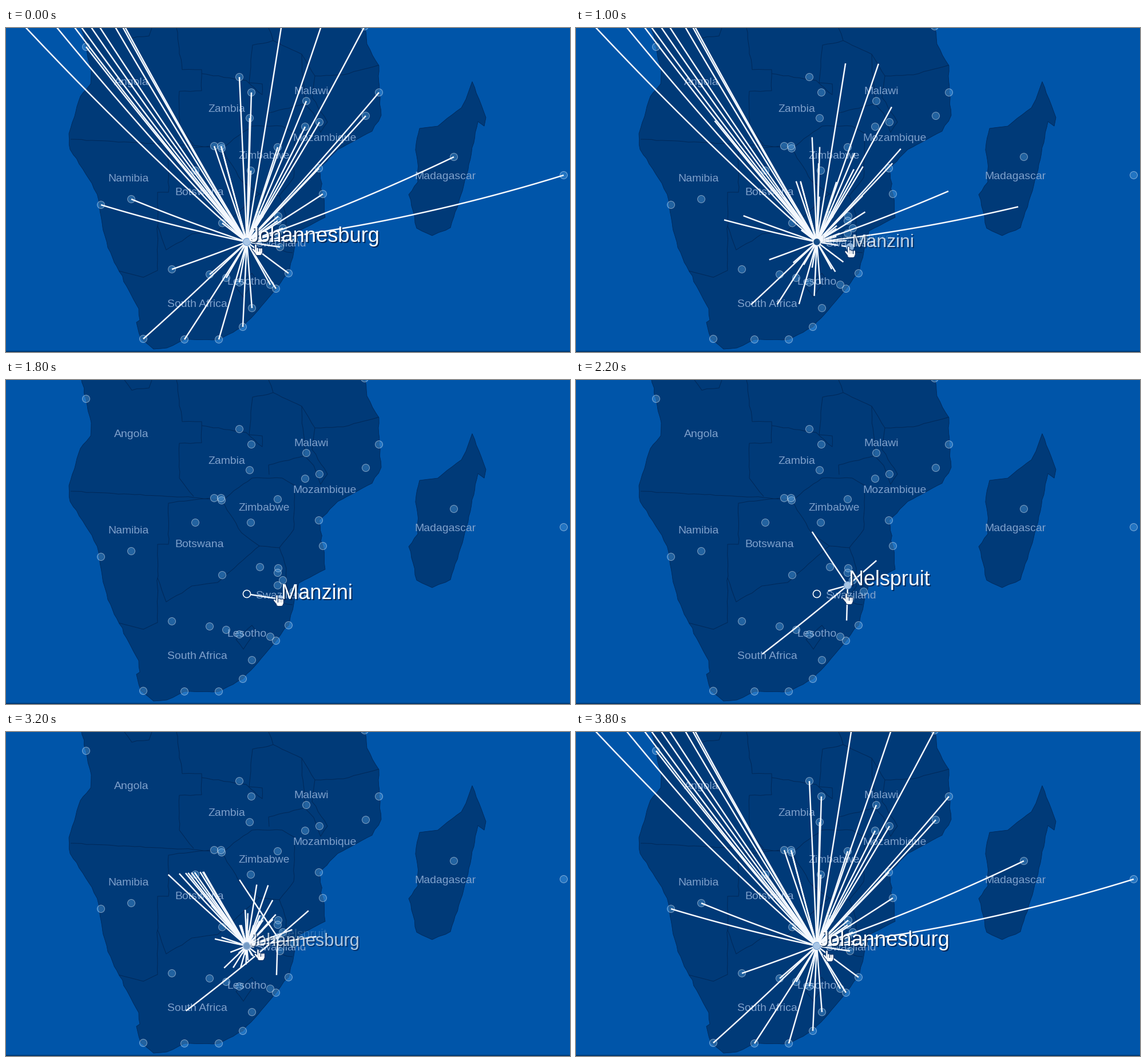
A matplotlib script that plays this animation: 986 px wide and 568 px high, repeating every 3900 ms.

```python
import numpy as np
import matplotlib.pyplot as plt
from matplotlib.animation import FuncAnimation
from matplotlib.collections import LineCollection
from matplotlib.patches import Circle, Polygon

W, H, DPI = 986, 568, 64
STEP, FRAMES = 100, 39
LOOP = STEP * FRAMES
PT = 72 / DPI  # points per pixel
SEA, LAND, BORDER = "#0055a9", "#003a78", "#002858"
FONT = "Liberation Sans"
GROW, LABEL_TIME = 500, 330
SAG = 1.75e-4
rng = np.random.default_rng(4)

# Ports also serve as key points of the coastline
PORTS = [(140, 33), (166, 310), (240, 545), (312, 546), (372, 546), (414, 524),
         (472, 457), (494, 430), (554, 291), (547, 246), (652, 113), (627, -3)]
(LUANDA, WALVIS, CAPE, GEORGE, ALGOA, BUFFALO,
 DURBAN, RICHARDS, VILANCULOS, BEIRA, NACALA, DAR) = PORTS
JNB, MANZINI, NELSPRUIT, FALLS = (421, 375), (479, 384), (475, 360), (377, 211)
INLAND = [
    MANZINI, NELSPRUIT, FALLS, (364, 207), (376, 207), (408, 86), (429, 113),
    (426, 158), (525, 128), (548, 165), (523, 173), (629, 154), (475, 209),
    (428, 250), (331, 250), (783, 226), (975, 258), (219, 300), (378, 342),
    (444, 328), (476, 330), (475, 338), (484, 351), (503, 371), (290, 423),
    (356, 432), (385, 438), (408, 446), (462, 450), (430, 491)]
AIRPORTS = PORTS + INLAND

MAINLAND = [
    (131, -5), LUANDA, (149, 75), (148, 98), (130, 120), (110, 185), (112, 213),
    (150, 272), (162, 302), (168, 342), (178, 385), (198, 427), (232, 492),
    (234, 512), (228, 516), (236, 545), (258, 563), (281, 561), GEORGE, ALGOA,
    BUFFALO, DURBAN, RICHARDS, (512, 356), (558, 332), VILANCULOS, BEIRA,
    (580, 213), (640, 181), (656, 153), NACALA, (652, 66), (631, 28), DAR]
MADAGASCAR = [
    (815, 94), (831, 135), (839, 157), (836, 172), (825, 164), (805, 258),
    (777, 350), (745, 364), (718, 351), (704, 292), (720, 270), (717, 203),
    (723, 176), (755, 172), (796, 140), (804, 125)]
BORDERS = [
    [(113, 195), (150, 197), (328, 206), FALLS, (430, 172), (483, 172)],
    [(207, 0), (220, 18), (250, 14), (255, 0)],
    [(298, 0), (308, 73), (342, 73), (342, 110), (303, 111), (303, 172), (328, 204)],
    [(357, 207), (284, 216), (284, 288), (265, 288), (265, 425), (240, 437), (198, 426)],
    [(265, 347), (280, 389), (325, 361), (370, 355), (443, 291)],
    [(402, 455), (430, 430), (437, 440), (415, 472), (402, 455)],
    [(342, 80), (420, 92), (448, 117), (448, 98), (425, 96), (431, 30), (467, 22), (459, 0)],
    [(467, 22), (517, 46), (522, 133), (459, 149), (460, 166)],
    [(483, 172), (505, 185), (503, 262), (478, 294), (490, 330), (490, 362),
     (472, 388), (501, 394)],
    [(517, 46), (540, 84), (535, 122), (562, 165), (550, 183), (538, 150), (522, 133)],
    [(540, 84), (590, 82), (652, 65)],
    [FALLS, (412, 268), (443, 291), (478, 294)]]

COUNTRIES = [
    ("Angola", 219, 93), ("Zambia", 386, 140), ("Malawi", 534, 109),
    ("Mozambique", 557, 191), ("Zimbabwe", 451, 222), ("Botswana", 338, 286),
    ("Namibia", 214, 262), ("Madagascar", 768, 258), ("Swaziland", 480, 376),
    ("Lesotho", 421, 443), ("South Africa", 334, 482)]

# time, x, y
CURSOR = np.array([(0, 440, 388), (700, 440, 388), (900, 480, 393), (2600, 475, 380),
                   (2900, 475, 380), (3200, 444, 390), (3800, 442, 392)])


def rough(points, size):
    """Split a polyline into short pieces and shake them a little."""
    out = []
    for a, b in zip(np.array(points[:-1], float), np.array(points[1:], float)):
        n = max(1, int(np.hypot(*(b - a)) // 9))
        piece = a + np.linspace(0, 1, n, endpoint=False)[:, None] * (b - a)
        piece[1:] += rng.normal(0, size, piece[1:].shape)
        out.extend(piece)
    return np.array(out + [points[-1]])


def ease(t):
    t = min(max(t, 0), 1)
    return 4 * t**3 if t < 0.5 else 1 - 4 * (1 - t)**3


def presence(now, spans, duration):
    return sum(ease((now - a) / duration) - ease((now - b) / duration)
               for a, b in spans)


def sag(dx, dy):
    return SAG * abs(dx) * np.hypot(dx, dy)


def route(start, end, part):
    """Part of a flight path that sags southward like a great circle."""
    u = np.linspace(0, part, 24)
    dx, dy = end[0] - start[0], end[1] - start[1]
    return np.column_stack([start[0] + dx * u,
                            start[1] + dy * u + sag(dx, dy) * u * (1 - u)])


def beyond(x, part):
    """Far place whose route leaves the top edge at x after the given part."""
    dx, dy = (x - JNB[0]) / part, -JNB[1] / part
    return JNB[0] + dx, JNB[1] + dy - sag(dx, dy) * (1 - part)


FAR = [beyond(x, 0.615) for x in (36, 90, 121, 133, 150, 165, 192, 205, 209)]
FAR += [beyond(x, 0.76) for x in (481, 550)]

# name, place, destinations, (start, stop) times of each hover
HUBS = [
    ("Johannesburg", JNB, AIRPORTS + FAR, [(3010 - LOOP, 775), (3010, 775 + LOOP)]),
    ("Manzini", MANZINI, [JNB], [(800, 1900)]),
    ("Nelspruit", NELSPRUIT, [JNB, FALLS, VILANCULOS, CAPE, DURBAN], [(1925, 2985)])]

fig = plt.figure(figsize=(W / DPI, H / DPI), dpi=DPI, facecolor=SEA)
ax = fig.add_axes([0, 0, 1, 1])
ax.set_xlim(0, W)
ax.set_ylim(H, 0)
ax.axis("off")

for shape in (MAINLAND, MADAGASCAR):
    ax.add_patch(Polygon(rough(shape, 0.7), fc=LAND, ec=BORDER, lw=0.8 * PT, zorder=1))
ax.add_collection(LineCollection([rough(b, 0.5) for b in BORDERS], colors=BORDER,
                                 linewidths=PT, zorder=2))

for name, x, y in COUNTRIES:
    ax.text(x, y + 7, name, family=FONT, size=19.4 * PT, color="#7fa0cb",
            ha="center", va="baseline", zorder=3)

for spot in AIRPORTS:
    ax.add_patch(Circle(spot, 6.5, fc=(0.45, 0.75, 1, 0.3), ec=(1, 1, 1, 0.45),
                        lw=PT, zorder=4))

ax.plot([0, W], [567, 567], color="#003a74", lw=2 * PT, zorder=9)
ax.plot([985.5, 985.5], [0, H], color="#001428", lw=PT, zorder=9)
ax.add_patch(Circle(JNB, 6.5, fc=LAND, ec="white", lw=1.6 * PT, zorder=6))


def make_hub(name, spot):
    lines = LineCollection([], colors="#f5f9ff", linewidths=2.5 * PT, zorder=5)
    ax.add_collection(lines)
    dot = ax.add_patch(Circle(spot, 6.5, fc="#a9c6e6", ec="#6c9ad0", lw=PT, zorder=6.5))
    style = dict(family=FONT, ha="left", va="baseline")
    shade = ax.text(spot[0] + 4, spot[1] + 2, name, color="#00204a", zorder=7, **style)
    label = ax.text(spot[0] + 2, spot[1], name, color="white", zorder=8, **style)
    return lines, dot, shade, label


def make_hand():
    """Pointing hand of round strokes: index, three fingers, thumb, palm."""
    strokes = [[(-4, -8), (-4, 4)]]
    strokes += [[(-0.7 + 3.3 * i, -2 + 0.6 * i), (-0.7 + 3.3 * i, 5)] for i in range(3)]
    strokes += [[(-8, 0), (-4, 5)], [(-1.5, 7), (4, 7)]]
    widths = np.array([2.6] * 5 + [6])
    layers = []
    for color, extra, z in (("#15386c", 2.4, 10), ("white", 0, 11)):
        layer = LineCollection([], colors=color, linewidths=(widths + extra) * PT,
                               capstyle="round", zorder=z)
        layers.append(ax.add_collection(layer))
    return np.array(strokes), layers


hub_art = [make_hub(name, spot) for name, spot, _, _ in HUBS]
hand, hand_layers = make_hand()


def draw(frame):
    now = frame * STEP
    for (name, spot, ends, spans), (lines, dot, shade, label) in zip(HUBS, hub_art):
        part = presence(now, spans, GROW)
        lines.set_segments([route(spot, end, part) for end in ends]
                           if part > 0.001 else [])
        shown = presence(now, spans, LABEL_TIME)
        dot.set_alpha(shown)
        for text, strength in ((shade, 0.85), (label, 1)):
            text.set_visible(shown > 0.01)
            text.set_fontsize(36.3 * PT * (0.5 + 0.5 * shown))
            text.set_alpha(strength * shown)
    pos = [np.interp(now, CURSOR[:, 0], CURSOR[:, i]) for i in (1, 2)]
    for layer in hand_layers:
        layer.set_segments(list(hand + pos))
    return []


anim = FuncAnimation(fig, draw, frames=FRAMES, interval=STEP,
                     repeat=True, repeat_delay=0, blit=False)
plt.show()
```
